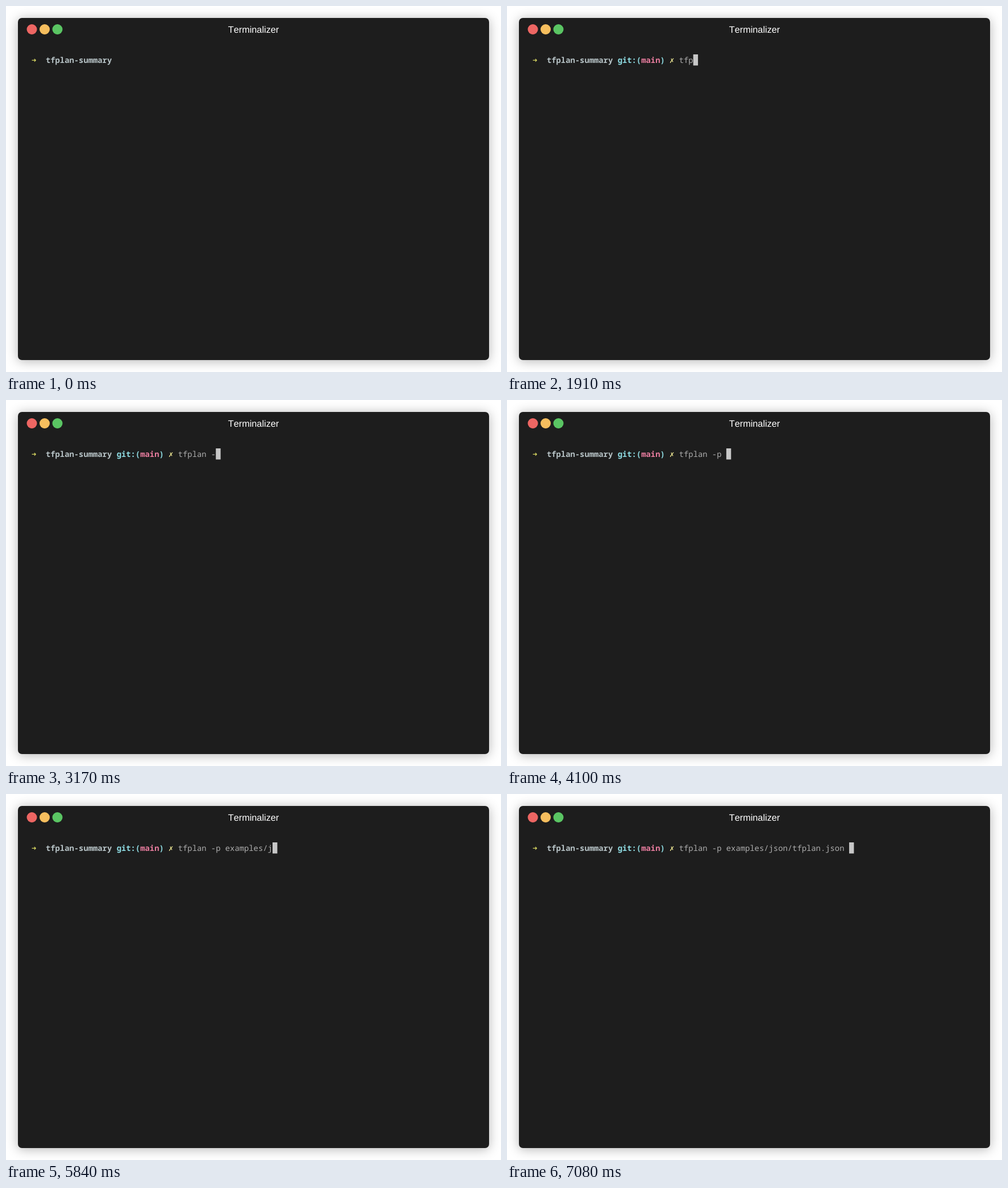
An HTML page that plays this animation: 871 px wide and 643 px high, repeating every 8000 ms.

```html
<!DOCTYPE html>
<html lang="en">
<head>
<meta charset="utf-8">
<title>Terminal</title>
<style>
  html, body { margin: 0; width: 100%; height: 100%; overflow: hidden; background: #fff; }
  .window {
    position: absolute; left: 21px; top: 21px; width: 829px; height: 601px;
    border-radius: 7px; background: #1d1d1d; box-shadow: 0 2px 20px rgba(0, 0, 0, .3);
  }
  svg { position: absolute; left: 0; top: 0; text-rendering: geometricPrecision; }
  text { white-space: pre; }
  .title { font: 16.3px "Liberation Sans", Arial, sans-serif; font-kerning: none; fill: #fff; }
  .line { font: 13.857px "Noto Sans Mono", "DejaVu Sans Mono", monospace; font-variant-ligatures: none; }
  .prompt { font-weight: 600; }
  .symbol { font-family: "DejaVu Sans Mono", monospace; }
</style>
</head>
<body>
<div class="window"></div>
<svg width="871" height="643" viewBox="0 0 871 643">
  <circle cx="45.5" cy="41" r="9" fill="#ed6663"/>
  <circle cx="68" cy="41" r="9" fill="#f6be5e"/>
  <circle cx="90.5" cy="41" r="9" fill="#5ac563"/>
  <text class="title" x="435.5" y="47" text-anchor="middle">Terminalizer</text>
  <g id="line" class="line"></g>
  <rect id="cursor" y="85" width="8.4" height="19.5" fill="#c7c7c7"/>
</svg>
<script>
const LOOP = 8000, LEFT = 45, CELL = 8.314, BASELINE = 100;
const COMMAND = "tfplan -p examples/json/tfplan.json ";
const COMMAND_COLUMN = 31, PROMPT_READY = 30;

// [time in ms, number of command characters shown]
const KEYS = [
  [1320, 1], [1520, 2], [1910, 3], [1990, 4], [2120, 5], [2270, 6], [2520, 7],
  [3170, 8], [3520, 9], [4100, 10], [4310, 11], [4510, 12], [4830, 19],
  [5840, 20], [6070, 24], [6670, 25], [6850, 26], [7080, 36]
];

const line = document.getElementById("line");
const cursor = document.getElementById("cursor");
const columnX = column => LEFT + column * CELL;

function addText(column, content, fill, className = "prompt") {
  const node = document.createElementNS("http://www.w3.org/2000/svg", "text");
  node.setAttribute("x", columnX(column));
  node.setAttribute("y", BASELINE);
  node.setAttribute("fill", fill);
  node.setAttribute("class", className);
  node.textContent = content;
  line.append(node);
  return node;
}

addText(0, "➜", "#d9d862", "prompt symbol");
addText(3, "tfplan-summary", "#b7c3c6");
const gitStatus = [
  addText(18, "git:(", "#8fdde4"),
  addText(23, "main", "#e87c9e"),
  addText(27, ")", "#8fdde4"),
  addText(29, "✗", "#f0e994", "prompt symbol")
];
const command = addText(COMMAND_COLUMN, "", "#adadad", "");

function render(time) {
  const visibility = time >= PROMPT_READY ? "visible" : "hidden";
  for (const node of [...gitStatus, cursor]) node.setAttribute("visibility", visibility);

  let typed = 0;
  for (const [start, count] of KEYS) if (time >= start) typed = count;
  command.textContent = COMMAND.slice(0, typed);
  cursor.setAttribute("x", columnX(COMMAND_COLUMN + typed));
}

const startTime = performance.now();
function tick() {
  render((performance.now() - startTime) % LOOP);
  requestAnimationFrame(tick);
}
tick();
</script>
</body>
</html>
```
